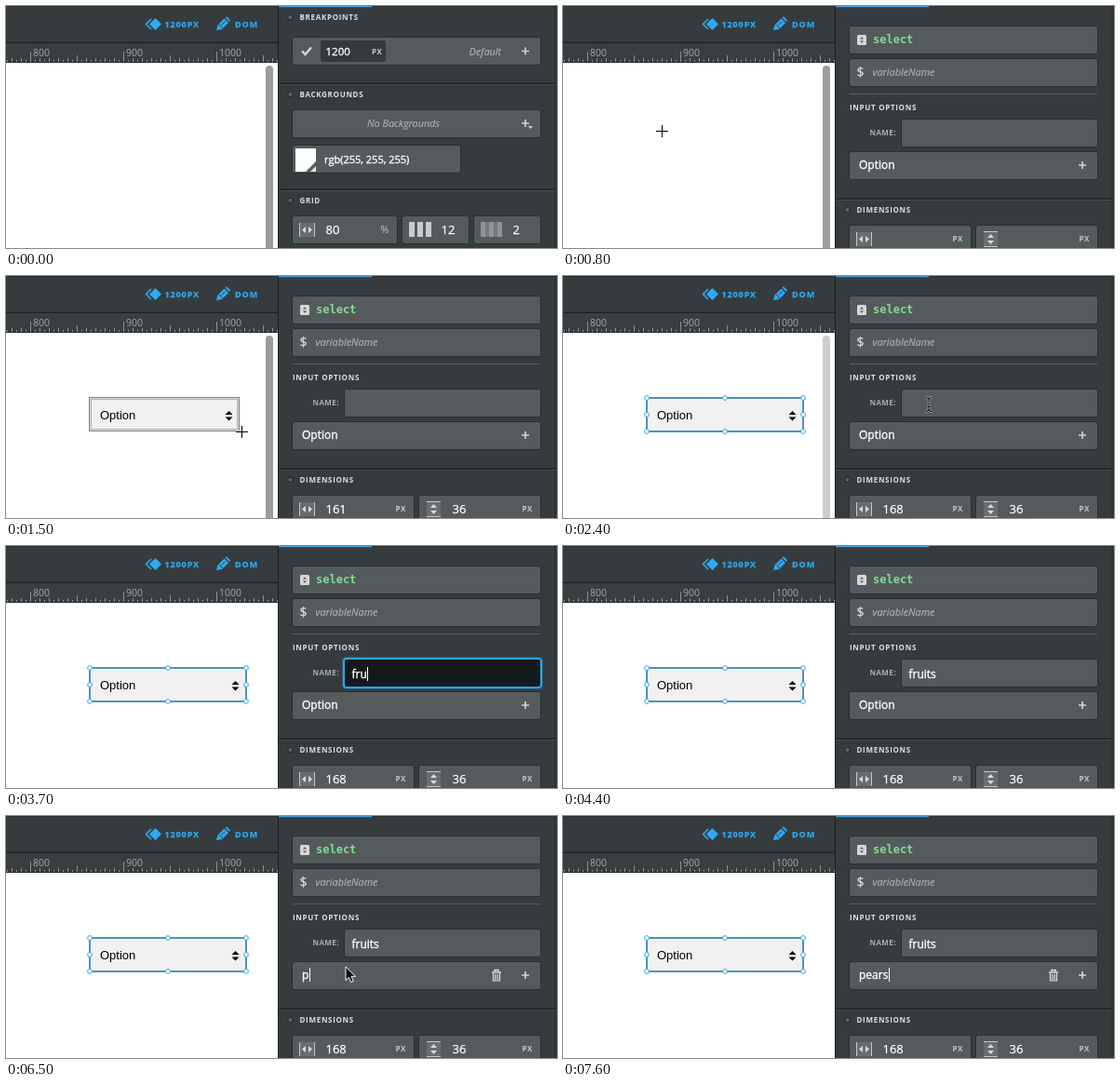
These frames come from a looping animation (592x260 px, 8 s). An HTML page:

```html
<!DOCTYPE html>
<html lang="en">
<head>
<meta charset="utf-8">
<title>Select input editor</title>
<style>
  html, body { margin: 0; width: 100%; height: 100%; overflow: hidden; background: #363c3e; }
  svg { display: block; }
  text { font-family: "Open Sans", sans-serif; font-size: 12px; fill: #fff; white-space: pre; }
  .value { stroke: #fff; stroke-width: .35px; }
  .head { font-size: 8px; font-weight: 700; letter-spacing: .7px; fill: #dcdfe0; }
  .name { font-size: 8px; font-weight: 700; letter-spacing: .4px; fill: #a9aeb0; }
  .unit { font-size: 8px; font-weight: 700; letter-spacing: .6px; fill: #c3c7c8; }
  .tool { font-size: 9px; font-weight: 700; letter-spacing: .9px; fill: #2fa9f4; stroke: #2fa9f4; stroke-width: .25px; }
  .hint { font-size: 10.8px; font-style: italic; fill: #a9aeb0; stroke: #a9aeb0; stroke-width: .2px; }
  .num { font-size: 13px; stroke: #fff; stroke-width: .25px; }
  .mark { font-size: 10.5px; fill: #a4a9ab; }
  .tag { font-family: "DejaVu Sans Mono", monospace; font-weight: 700; fill: #82dc92; }
  .native { font-family: "Liberation Sans", Arial, sans-serif; font-size: 13px; fill: #000; }
</style>
</head>
<body>
<svg id="stage" width="592" height="260" viewBox="0 0 592 260"></svg>
<script>
const LOOP = 8000, STEP = 100;

// Markup helpers
const rect = (x, y, w, h, fill, extra = '') =>
  `<rect x="${x}" y="${y}" width="${w}" height="${h}" fill="${fill}" ${extra}/>`;
const path = (d, fill, extra = '') => `<path d="${d}" fill="${fill}" ${extra}/>`;
const line = (d, color, width = 1, extra = '') =>
  path(d, 'none', `stroke="${color}" stroke-width="${width}" ${extra}`);
const text = (x, y, cls, str, extra = '') =>
  `<text x="${x}" y="${y}" class="${cls}" ${extra}>${str}</text>`;
const group = (id, body, extra = '') => `<g id="${id}" ${extra}>${body}</g>`;
const field = (x, y, w, h = 29) =>
  rect(x - .5, y - .5, w + 1, h + 1, '#555b5d', 'rx="2.5" stroke="#2a2e30"');
const plus = (x, y) => line(`M${x - 4} ${y}h8M${x} ${y - 4}v8`, '#cfd3d4', 1.7);
const divider = y => rect(293, y, 297, 1.5, '#1f2325') + rect(293, y + 1.5, 297, 1, '#454b4d');
const section = (y, title) =>
  `<circle cx="305.5" cy="${y}" r="2.8" fill="#575e61" stroke="#1e2224"/>` + text(315.5, y + 3, 'head', title);

// Icons
const widthIcon = (x, y) =>
  rect(x, y, 17, 15, '#686e70') + line(`M${x + .5} ${y}v15M${x + 16.5} ${y}v15`, '#c5c9ca') +
  path(`M${x + 7} ${y + 4}v7l-4-3.5zM${x + 10} ${y + 4}v7l4-3.5z`, '#d7dadb');
const heightIcon = (x, y) =>
  rect(x, y, 15, 17, '#686e70') + line(`M${x} ${y + .5}h15M${x} ${y + 16.5}h15`, '#c5c9ca') +
  path(`M${x + 4} ${y + 7}h7l-3.5-4zM${x + 4} ${y + 10}h7l-3.5 4z`, '#d7dadb');
const columns = (x, y, n, w, gap, fill) =>
  Array.from({ length: n }, (_, i) => rect(x + i * (w + gap), y, w, 16, fill)).join('');

const ruler = () => {
  let d = '';
  for (let x = 1; x < 292; x += 5) {
    const unit = x + 774;
    const h = unit % 100 ? unit % 50 ? unit % 10 ? 2 : 4 : 7 : 11;
    d += `M${x + .5} 60v${-h}`;
  }
  return line(d, '#8d9294') +
    [800, 900, 1000].map((n, i) => text(29 + i * 100, 54, 'mark', n)).join('');
};

const frame =
  rect(0, 0, 592, 260, '#363c3e') + rect(0, 0, 592, 1, '#2a2f31') +
  rect(0, 38.5, 292, 1.5, '#1f2325') + rect(0, 40, 292, 21, '#393f41') + ruler() +
  rect(0, 60, 292, 1, '#202426') + rect(0, 61, 292, 199, '#fff') +
  path('M160.500 13l6.500 6.500l-6.500 6.500l-6.500-6.500z', '#2fa9f4') +
  line('M156 14l-5.500 5.500l5.500 5.500', '#2fa9f4', 1.6) +
  text(170.500, 23, 'tool', '1200PX') +
  path('M226 26l1.500-5.500l7-7l4.500 4.500l-7 7zM235.500 12.500l1.500-1.200l4.200 4.200l-1.200 1.500z', '#2fa9f4') +
  line('M229 20l4 4M231.500 20.500l4-4', '#363c3e', 1) +
  text(246, 23, 'tool', 'DOM') +
  rect(292, 0, 1, 260, '#1b1f21') + rect(589.5, 0, 1, 260, '#25292b') +
  rect(293, 0, 100, 1.2, '#3f9fdc') +
  rect(279, 64, 8, 210, '#9c9c9c', 'rx="4" id="bar"');

const pagePanel =
  section(12, 'BREAKPOINTS') +
  field(308, 34, 266) + line('M318 48.500l3.500 3.500l6.500-7.500', '#d5d8d9', 2.4) +
  rect(338, 37, 70, 23, '#34393b', 'rx="2"') +
  text(343.500, 53, 'value', '1200', 'style="font-size:11.5px"') + text(393, 52, 'unit', 'PX') +
  text(497.500, 53, 'hint', 'Default') + plus(558, 48.500) +
  divider(82.500) + section(95, 'BACKGROUNDS') +
  field(308, 112, 266) + text(388, 130, 'hint', 'No Backgrounds') +
  plus(558, 126) + path('M561 129h5l-2.500 3z', '#cfd3d4') +
  field(308, 150, 180) + rect(311, 153, 22, 25, '#fff') +
  path('M333 167v11h-11z', '#555b5d') + path('M333 172v6h-6z', '#e4e6e7') +
  text(342, 169, 'value', 'rgb(255, 255, 255)', 'style="font-size:11px"') +
  divider(196.500) + section(209, 'GRID') +
  field(308, 226, 112) + widthIcon(315, 233) + text(343.500, 245, 'num', '80') +
  text(402.500, 244, '', '%', 'style="font-size:10.5px;fill:#c3c7c8"') +
  field(426, 226, 71) + columns(433, 232, 3, 6, 3, '#c9cccd') + text(467.500, 245, 'num', '12') +
  field(503, 226, 71) + rect(510, 232, 23, 16, '#757b7d') + columns(510, 232, 3, 5, 4, '#8f9597') +
  text(544.500, 245, 'num', '2');

const trash =
  line('M522 168h10M525 167v-1.500h4v1.500', '#dfe1e2', 1.5) +
  line('M523.500 169v8h7v-8M525.800 170v6M528.200 170v6', '#dfe1e2', 1.2);

const selectPanel =
  field(308, 22, 266) + rect(316, 31, 10, 11, '#d5d8d9', 'rx="1.5"') +
  path('M319 35.500h4l-2-2.200zM319 37.500h4l-2 2.200z', '#50575a') +
  text(333, 40, 'tag', 'select') +
  field(308, 57, 266) + text(315.500, 76, '', '$', 'style="font-size:14px;font-weight:600;fill:#d5d8d9"') +
  text(332.500, 75, 'hint', 'variableName') +
  rect(308, 94, 266, 1, '#5a6062') + text(308, 112, 'head', 'INPUT OPTIONS') +
  text(329.500, 139, 'name', 'NAME:') + field(364, 122, 210) +
  group('focus',
    rect(363, 121, 212, 31, 'none', 'rx="3" stroke="#1f9fe4" stroke-width="4" opacity=".3"') +
    rect(363, 121, 212, 31, '#14191b', 'rx="3" stroke="#27a6ec" stroke-width="2"')) +
  text(371.500, 142, 'value', '', 'id="name"') +
  field(308, 157, 266) + rect(317.500, 162, 37.500, 18, '#3f88b4', 'id="mark"') +
  text(318, 175, 'value', '', 'id="option"') + group('trash', trash) + plus(558, 171) +
  rect(0, 0, 1, 15, '#fff', 'id="caret"') +
  divider(206.500) + section(219, 'DIMENSIONS') +
  field(308, 236, 130) + widthIcon(315, 243) + text(343.500, 255, 'num', '', 'id="wide"') + text(418.500, 253, 'unit', 'PX') +
  field(444, 236, 130) + heightIcon(452, 242) + text(479.500, 255, 'num', '', 'id="high"') + text(554.500, 253, 'unit', 'PX');

let handles = '';
for (const x of [90, 174, 258])
  for (const y of [131, 149, 167])
    if (x !== 174 || y !== 149)
      handles += `<circle cx="${x}" cy="${y}" r="2.4" fill="#fff" stroke="#2aa9e8"/>`;

const drawn =
  group('draft',
    rect(89.500, 130.500, 0, 0, '#dcdcdc', 'stroke="#7e7e7e" id="outer"') +
    rect(91.500, 132.500, 0, 0, '#f1f1f1', 'stroke="#b0b0b0" id="inner"')) +
  group('picked',
    rect(90, 131, 168, 36, '#f1f1f1', 'stroke="#3d87ae" stroke-width="1.8"') + handles) +
  `<svg id="face" x="90" y="131" width="0" height="0">` +
    group('label', text(11, 5, 'native', 'Option')) +
    group('arrows', path('M-4 -1h8l-4-4zM-4 1.500h8l-4 4z', '#000')) + '</svg>';

const cursors =
  group('cross', line('M-6 .5h13M.5 -6v13', '#fff', 3, 'opacity=".6"') + line('M-6 .5h13M.5 -6v13', '#000')) +
  group('beam', ['#b9bdbe', '#111'].map((c, i) =>
    line('M-3.500 -7.500q3 0 3.500 2v11q-.5 2-3.500 2M3.500 -7.500q-3 0-3.500 2v11q.5 2 3.500 2M-2 2.500h4', c, 2.4 - i * 1.3)).join('')) +
  group('arrow', path('M0 0v14.500l3.400-3.200l2.300 5.300l2.600-1.100l-2.300-5.200h4.500z', '#000', 'stroke="#fff" stroke-width="1"'));

document.getElementById('stage').innerHTML =
  frame + group('page', pagePanel) + group('select', selectPanel) + group('drawn', drawn) + cursors;

const el = Object.fromEntries([...document.querySelectorAll('[id]')].map(n => [n.id, n]));
const show = (id, on) => { el[id].style.display = on ? '' : 'none'; };
const size = (id, w, h) => {
  el[id].setAttribute('width', Math.max(0, w));
  el[id].setAttribute('height', Math.max(0, h));
};
const move = (id, x, y) => el[id].setAttribute('transform', `translate(${x} ${y})`);

// [time, pointer kind, x, y]
const pointer = [
  [0, ''],
  [400, 'cross', 8, 118], [500, 'cross', 34, 124], [600, 'cross', 66, 130],
  [700, 'cross', 92, 133], [800, 'cross', 106, 134], [900, 'cross', 112, 134],
  [1000, 'cross', 103, 132], [1100, 'cross', 94, 131],
  [1200, 'cross', 112, 136], [1300, 'cross', 172, 153], [1400, 'cross', 228, 164],
  [1500, 'cross', 253, 167], [1600, 'cross', 258, 167], [1700, 'cross', 260, 167],
  [1900, 'arrow', 294, 201], [2300, 'arrow', 342, 168],
  [2400, 'beam', 393, 138], [2500, 'beam', 420, 137], [2600, 'beam', 432, 137],
  [3200, ''],
  [4900, 'beam', 428, 138], [5000, 'beam', 416, 142], [5100, 'beam', 400, 147],
  [5200, 'arrow', 383, 155], [5300, 'arrow', 371, 160], [5400, 'arrow', 365, 162],
  [6600, '']
];
const nameKeys = [3200, 3500, 3700, 3800, 4000, 4200];
const optionKeys = [6500, 7000, 7200, 7300, 7600];

const at = (table, t) => table.filter(row => row[0] <= t).pop();
const typed = (word, keys, t) => word.slice(0, keys.filter(k => k <= t).length);

function render(time) {
  const t = Math.floor(time / STEP) * STEP;
  const [, kind, x, y] = at(pointer, t);
  for (const id of ['cross', 'beam', 'arrow']) show(id, id === kind);
  if (kind) move(kind, x, y);

  show('page', t < 300);
  show('select', t >= 300);
  el.bar.style.opacity = Math.max(0, Math.min(1, 1 - (t - 2200) / 400));

  // Drawing the box, then its selected state
  const drawing = t >= 1200, done = t >= 1900;
  const w = done ? 168 : x - 92, h = done ? 36 : y - 131;
  show('drawn', drawing);
  show('draft', !done);
  show('picked', done);
  if (drawing) {
    size('outer', w, h);
    size('inner', w - 4, h - 4);
    size('face', w, h);
    move('label', 0, h / 2);
    move('arrows', w - 11.5, h / 2 + 1);
  }
  el.wide.textContent = drawing ? w : '';
  el.high.textContent = drawing ? h : '';

  // Typing
  const naming = t >= 2800 && t < 4400, editing = t >= 6500;
  el.name.textContent = typed('fruits', nameKeys, t);
  el.option.textContent = editing ? typed('pears', optionKeys, t) : 'Option';
  show('focus', naming);
  show('mark', t >= 5900 && !editing);
  show('trash', t >= 5300);
  show('caret', naming || editing);
  if (naming) move('caret', Math.round(371.5 + el.name.getComputedTextLength()), 130);
  if (editing) move('caret', Math.round(318.5 + el.option.getComputedTextLength()), 163);
}

const start = performance.now();
function tick() {
  render((performance.now() - start) % LOOP);
  requestAnimationFrame(tick);
}
tick();
</script>
</body>
</html>
```
